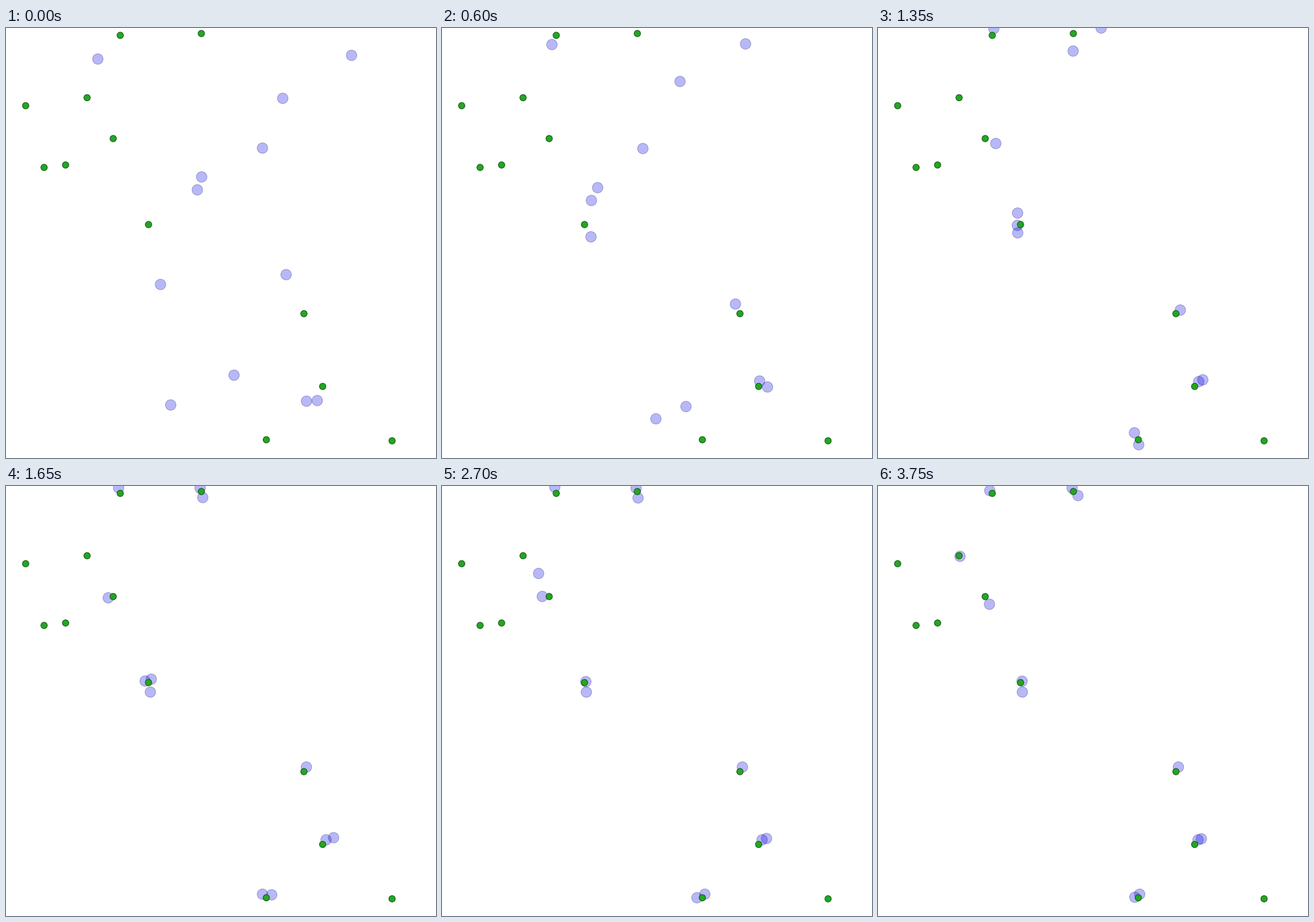
A matplotlib script for the animation above (3900 ms loop, 700 by 700 pixels).

```python
import matplotlib.pyplot as plt
import numpy as np
from matplotlib.animation import FuncAnimation
from matplotlib.patches import Circle

SIZE = 700
FRAMES, INTERVAL = 26, 150
LAUNCH, PASS, ARRIVE = 2, 7, 11    # ends of the start, the trip, the landing
REACH = 35.36                      # |dx| + |dy| covered during the start

FOOD = [(186, 12), (318, 9), (132, 113.5), (32, 126.5), (174.5, 180),
        (62, 227), (97, 223), (232, 320), (485, 465), (515.5, 583.5),
        (423.8, 670.3), (628.5, 672)]


def glide(f, begin, end, p, v, q, w=(0, 0)):
    """Cubic from p with velocity v at begin to q with velocity w at end."""
    p, v, q, w = map(np.asarray, (p, v, q, w))
    t = end - begin
    u = (f - begin) / t
    return (p + (q - p) * u * u * (3 - 2 * u)
            + v * t * u * (1 - u) ** 2 - w * t * u * u * (1 - u))


class Agent:
    """Speeds up along a heading, passes a point, then sways around a rest."""

    def __init__(self, start, heading, via, rest, swing=(0, 0), peak=ARRIVE,
                 period=20, reach=REACH, escape=None):
        a = np.radians(heading)
        d = np.array([np.cos(a), np.sin(a)])
        self.start = np.array(start)
        self.step = reach * d / np.abs(d).sum()
        self.via, self.rest, self.swing = map(np.array, (via, rest, swing))
        self.peak, self.period, self.escape = peak, period, escape
        self.patch = dot(start, 8.6, (0, 0, 0.9, 0.28), (0, 0, 0.35, 0.3), 2)

    def sway(self, f):
        turn = 2 * np.pi * (f - self.peak) / self.period
        return self.rest + self.swing * np.cos(turn)

    def at(self, f):
        if f <= LAUNCH:
            return self.start + self.step * f * (f + 1) / 6
        launched, landed = self.start + self.step, self.sway(ARRIVE)
        cruise = (landed - launched) / (ARRIVE - LAUNCH)
        if f <= PASS:
            return glide(f, LAUNCH, PASS, launched, self.step * 2 / 3,
                         self.via, cruise)
        if f <= ARRIVE:
            return glide(f, PASS, ARRIVE, self.via, cruise, landed)
        if self.escape:
            begin, end, velocity, goal = self.escape
            if f > begin:
                return glide(min(f, end), begin, end, self.sway(begin),
                             velocity, goal)
        return self.sway(f)


fig = plt.figure(figsize=(7, 7), dpi=100, facecolor="white")
ax = fig.add_axes((0, 0, 1, 1))
ax.set_xlim(0, SIZE)
ax.set_ylim(SIZE, 0)
ax.axis("off")


def dot(pos, radius, face, edge, z):
    return ax.add_patch(Circle(pos, radius, facecolor=face, edgecolor=edge,
                               linewidth=0.72, zorder=z))


for pos in FOOD:
    dot(pos, 5.2, (0.14, 0.65, 0.14), (0.06, 0.33, 0.06), 3)

agents = [
    # top
    Agent((149, 50), -30, (191, 3), (182.5, 3.5), (1, -3.5), peak=15,
          reach=22),
    Agent((562, 44), 188.3, (434, 0), (315.5, 3)),
    Agent((450, 114), 210, (326.5, 65), (321, 17.5), (-4, 2.5), peak=15),
    Agent((417, 195), 180, (240.5, 195), (169.5, 184), (-11.5, -8), peak=15),
    # centre left
    Agent((318, 242), 189.3, (222.5, 319), (234.5, 316.5), (1.5, -2.5)),
    Agent((311, 263), 180, (224, 323), (234.5, 335)),
    Agent((251, 417), 265.7, (230, 292), (228, 304), (-2, 13), period=8,
          escape=(13, 20, (12, -24), (133, 114))),
    # lower right
    Agent((455.5, 401), 71.2, (492, 457), (488.5, 457)),
    Agent((488.7, 607), -52.4, (521, 576), (520.5, 575.5)),
    Agent((506.2, 606), -34.5, (522.5, 575), (529, 573), (3.8, -1), period=10,
          reach=27),
    # bottom
    Agent((370.7, 564.7), 64.4, (413, 644.5), (423.5, 664), (-6.5, 0)),
    Agent((267.6, 613.2), 0, (401.5, 685), (421, 668), (11, -3)),
]


def draw(frame):
    for agent in agents:
        agent.patch.center = tuple(agent.at(frame) + 0.5)
    return [agent.patch for agent in agents]


anim = FuncAnimation(fig, draw, frames=FRAMES, interval=INTERVAL,
                     repeat=True, repeat_delay=0, blit=False)
plt.show()
```
